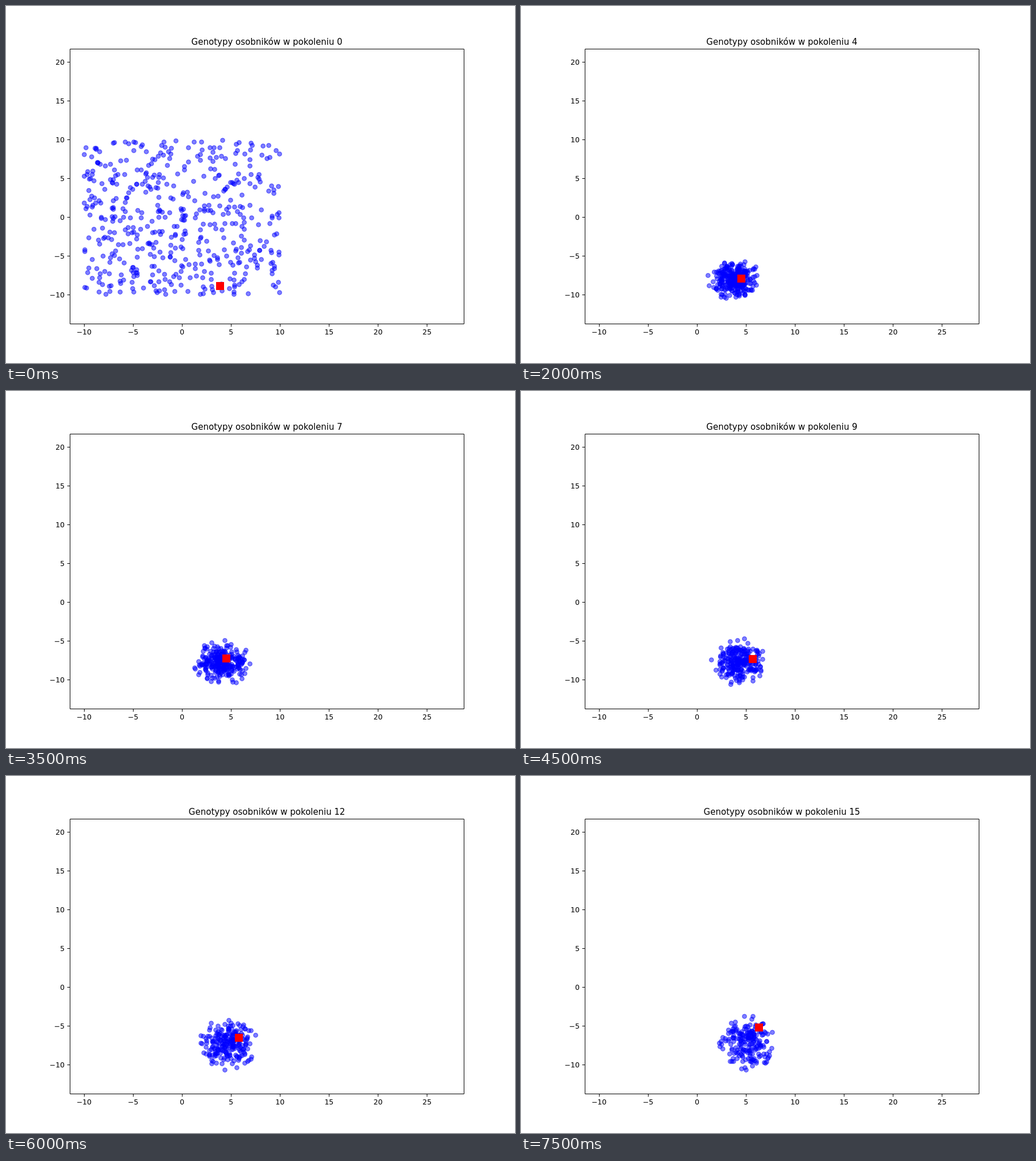
These frames come from a looping animation (894 by 626 pixels, 8000 ms). An HTML page:

```html
<!DOCTYPE html>
<html lang="pl">
<head>
<meta charset="utf-8">
<title>Genotypy</title>
<style>
  html, body { margin: 0; width: 100%; height: 100%; overflow: hidden; background: #fff; }
  svg { display: block; }
  text { font: 12.5px "DejaVu Sans", sans-serif; fill: #000; }
  #title { font-size: 15px; text-anchor: middle; }
  #axes path { fill: none; stroke: #000; stroke-width: 1; }
  #dots { fill: #00f; fill-opacity: .5; stroke: #00f; stroke-opacity: .5; stroke-width: 1.25; }
</style>
</head>
<body>
<svg width="894" height="626" viewBox="0 0 894 626">
  <g id="dots"></g>
  <rect id="best" width="14" height="14" fill="#f00"/>
  <g id="axes"></g>
  <text id="title" x="458.2" y="67.6"></text>
</svg>
<script>
const STEP = 500, GENERATIONS = 16;
const $ = id => document.getElementById(id);
const snap = v => Math.floor(v) + 0.5;
const toX = v => 309.2 + 17.21 * v;
const toY = v => 370.5 - 13.6 * v;

// Path of the best individual: generation, x, y
const BEST = [[0, 376, 491], [2, 376, 491], [5, 392, 472], [7, 387, 469],
  [10, 417, 471], [13, 405, 453], [15, 418, 441]];

function randomizer(seed) {
  return () => {
    seed = (seed + 0x6D2B79F5) | 0;
    let t = Math.imul(seed ^ (seed >>> 15), 1 | seed);
    t = (t + Math.imul(t ^ (t >>> 7), 61 | t)) ^ t;
    return ((t ^ (t >>> 14)) >>> 0) / 4294967296;
  };
}

function scatter() {
  const rnd = randomizer(5);
  return Array.from({ length: 490 }, () => [toX(rnd() * 20 - 10), toY(rnd() * 20 - 10)]);
}

// Gaussian cloud in which some individuals inherit a coordinate from earlier ones
function cloud(gen) {
  const rnd = randomizer(100 + gen), points = [];
  const gauss = () => Math.sqrt(-2 * Math.log(1 - rnd())) * Math.cos(2 * Math.PI * rnd());
  const inherit = axis => points.length > 40 && rnd() < 0.2
    ? points[Math.floor(rnd() * points.length)][axis] : gauss();
  while (points.length < 350 - 10 * gen) {
    const p = [inherit(0), inherit(1)];
    if (Math.hypot(...p) < 2.5) points.push(p);
  }
  const cx = 366 + 2 * gen, cy = 479 - 0.05 * gen * gen;
  const sx = 17 + 0.4 * gen, sy = 13.5 + 0.4 * gen;
  return points.map(([x, y]) => [cx + sx * x, cy + sy * y]);
}

function bestAt(gen) {
  const i = Math.max(1, BEST.findIndex(key => key[0] >= gen));
  const [a, b] = [BEST[i - 1], BEST[i]];
  const k = (gen - a[0]) / (b[0] - a[0]);
  return [1, 2].map(n => Math.round(a[n] + (b[n] - a[n]) * k));
}

function drawAxes() {
  const label = v => String(v).replace("-", "\u2212");
  let path = "M112.5 75.5H804.5V557.5H112.5Z", labels = "";
  for (let v = -10; v <= 25; v += 5) {
    path += `M${snap(toX(v))} 557.5v4.9`;
    labels += `<text x="${toX(v)}" y="576" text-anchor="middle">${label(v)}</text>`;
    if (v > 20) continue;
    path += `M112.5 ${snap(toY(v))}h-4.9`;
    labels += `<text x="103" y="${toY(v) + 4.6}" text-anchor="end">${label(v)}</text>`;
  }
  $("axes").innerHTML = `<path d="${path}"/>${labels}`;
}

const populations = Array.from({ length: GENERATIONS }, (_, gen) => gen ? cloud(gen) : scatter());
let shown = -1;

function render(time) {
  const gen = Math.floor(time / STEP) % GENERATIONS;
  if (gen === shown) return;
  shown = gen;
  $("dots").innerHTML = populations[gen]
    .map(([x, y]) => `<circle cx="${snap(x)}" cy="${snap(y)}" r="3.75"/>`).join("");
  const [x, y] = bestAt(gen);
  $("best").setAttribute("x", x - 7);
  $("best").setAttribute("y", y - 7);
  $("title").textContent = `Genotypy osobników w pokoleniu ${gen}`;
}

drawAxes();
render(0);
const start = performance.now();
requestAnimationFrame(function tick() {
  render(performance.now() - start);
  requestAnimationFrame(tick);
});
</script>
</body>
</html>
```
